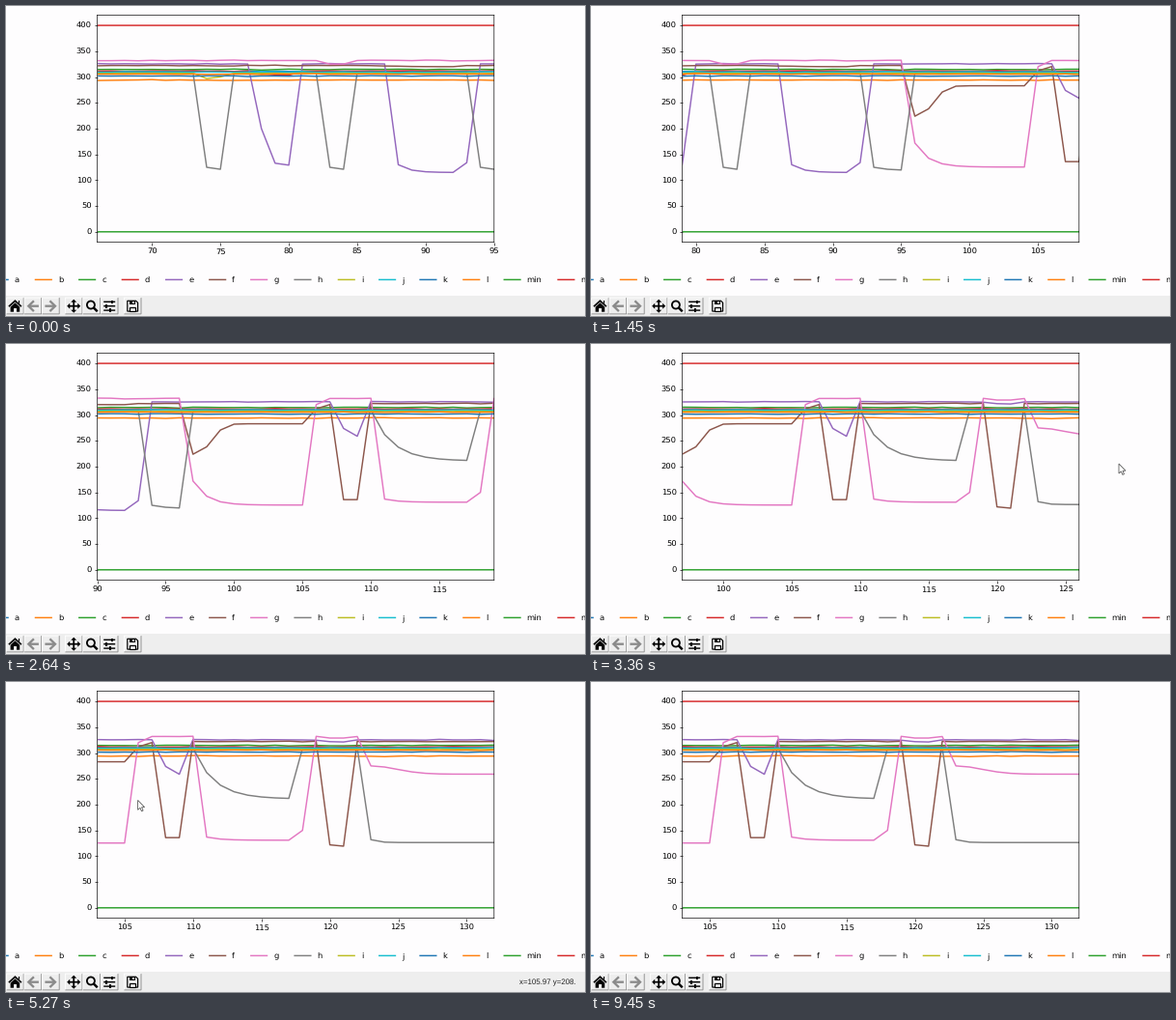
Animation, 600 px wide and 321 px high, one loop 9700 ms. Source, as a matplotlib script:

```python
import numpy as np
import matplotlib.pyplot as plt
from matplotlib.animation import FuncAnimation
from matplotlib.patches import Circle, Polygon, Rectangle
from matplotlib.ticker import MultipleLocator

W, H, DPI = 600, 321, 60
LOOP, STEP = 9700, 25
PT = 72 / DPI                      # points per pixel
LEFT, RIGHT, TOP, BOTTOM = 94.5, 505.8, 9.4, 244.5
Y_MIN, Y_MAX = -20, 420
SPAN, FIRST, SHIFTS, BEAT = 29, 66, 37, 109
PAPER, BAR = "#fefdfe", "#eeeeee"

plt.rcParams.update({"font.family": "DejaVu Sans", "font.size": 10,
                     "text.hinting": "none", "lines.linewidth": 1.75})
fig = plt.figure(figsize=(W / DPI, H / DPI), dpi=DPI, facecolor=PAPER)

# ---------------------------------------------------------------- readings
n = np.arange(62, 137)
rng = np.random.default_rng(4)
LEVELS = dict(a=311, b=294, c=314.6, d=311.5, e=325.5, f=322.3, g=332,
              h=309, i=307.5, j=309.8, k=302, l=305.5)
data = {name: level + rng.normal(0, 0.4, n.size)
        for name, level in LEVELS.items()}
data["min"] = np.zeros(n.size)
data["max"] = np.full(n.size, 400.0)


def dip(name, start, count, first, last, rate=1.0, power=1):
    """Readings that leave the level at `first` and settle towards `last`."""
    k = np.arange(count)
    i = start - n[0]
    data[name][i:i + count] = last + (first - last) * np.exp(-(rate * k) ** power)


dip("d", 78, 3, 306, 303)
dip("e", 78, 3, 200, 129, 2.9)
dip("e", 88, 5, 130, 115, 1.2)
dip("e", 93, 1, 134, 134)
dip("e", 108, 2, 274, 250)
dip("e", 120, 2, 322, 321)
dip("f", 88, 5, 321, 320)
dip("f", 97, 9, 224, 283, 0.6, 2.5)
dip("f", 106, 2, 312, 325)
dip("f", 108, 2, 136, 136)
dip("f", 120, 2, 122, 118)
dip("g", 83, 2, 325, 325)
dip("g", 97, 9, 172, 125.5)
dip("g", 106, 1, 320, 320)
dip("g", 111, 7, 137, 131)
dip("g", 118, 1, 150, 150)
dip("g", 120, 2, 329, 329)
dip("g", 123, 14, 275, 259, 0.38, 2)
for start, count in ((74, 2), (83, 2), (94, 3)):
    dip("h", start, count, 125, 119)
dip("h", 111, 7, 262, 211, 0.65)
dip("h", 123, 14, 132, 126.5, 2)
dip("i", 74, 2, 297, 302)

# ---------------------------------------------------------------- chart
ax = fig.add_axes([LEFT / W, 1 - BOTTOM / H, (RIGHT - LEFT) / W,
                   (BOTTOM - TOP) / H], facecolor=PAPER)
ax.set_ylim(Y_MIN, Y_MAX)
ax.xaxis.set_major_locator(MultipleLocator(5))
ax.yaxis.set_major_locator(MultipleLocator(50))
lines = [ax.plot(n, y, label=name)[0] for name, y in data.items()]

key = fig.legend(handles=lines, ncol=len(lines), loc="center left",
                 bbox_to_anchor=(-18 / W, 1 - 284.1 / H), borderaxespad=0,
                 frameon=False)
for item in [*lines, *key.get_lines(), *ax.spines.values()]:
    item.set_snap(False)

# ---------------------------------------------------------------- pixel layer
top = fig.add_axes([0, 0, 1, 1], zorder=5)
top.set_xlim(0, W)
top.set_ylim(H, 0)
top.axis("off")


def stroke(xs, ys, color="black", w=1.5):
    top.plot(xs, ys, color=color, lw=w * PT, solid_capstyle="butt",
             solid_joinstyle="miter", snap=False)


def fill(points, color="black", **kw):
    return top.add_patch(Polygon(points, fc=color, snap=False,
                                 **{"ec": "none", **kw}))


def box(x, y, w, h, color="black", **kw):
    top.add_patch(Rectangle((x, y), w, h, fc=color, **{"ec": "none", **kw}))


def home(x, y):
    stroke([x - 6.5, x, x + 6.5], [y + 0.5, y - 5.4, y + 0.5], w=1.7)
    fill([(x - 4.8, y + 1), (x, y - 3.4), (x + 4.8, y + 1),
          (x + 4.8, y + 6), (x - 4.8, y + 6)])
    box(x - 1.1, y + 2.2, 2.2, 3.8, BAR)
    box(x + 3.2, y - 5.7, 1.7, 3.5)


def arrow(x, y, s):
    stroke([x + s, x - 4.6 * s, x + s], [y - 5.4, y, y + 5.4], "#8a8a8a", 2.3)
    stroke([x - 4 * s, x + 6 * s], [y, y], "#8a8a8a", 2.3)


def pan(x, y):
    stroke([x - 5, x + 5], [y, y], w=1.7)
    stroke([x, x], [y - 5, y + 5], w=1.7)
    for dx, dy in ((1, 0), (-1, 0), (0, 1), (0, -1)):
        bx, by = x + 4 * dx, y + 4 * dy
        fill([(x + 7 * dx, y + 7 * dy), (bx + 3 * dy, by + 3 * dx),
              (bx - 3 * dy, by - 3 * dx)])


def zoom(x, y):
    top.add_patch(Circle((x - 0.8, y - 1.2), 4, fc="none", ec="black",
                         lw=1.8 * PT))
    stroke([x + 2, x + 6], [y + 1.6, y + 5.6], w=2.4)


def sliders(x, y):
    for dy, knob in ((-4.4, 3), (0, -3), (4.4, 1)):
        stroke([x - 6, x + 6], [y + dy, y + dy], w=1.4)
        box(x + knob - 1.2, y + dy - 1.8, 2.4, 3.6)


def save(x, y):
    edge = dict(ec="black", lw=1.2 * PT)
    fill([(x - 5.4, y - 5.4), (x + 3.4, y - 5.4), (x + 5.4, y - 3.4),
          (x + 5.4, y + 5.4), (x - 5.4, y + 5.4)], BAR, **edge)
    box(x - 3.4, y - 5.4, 6, 3.8)
    box(x + 0.2, y - 4.8, 1.4, 2.4, BAR)
    box(x - 3.2, y + 1, 6.4, 4.4, BAR, **edge)


def button(x, y, size=18.4):
    """Raised frame: light on the upper left, shaded on the lower right."""
    a, b = x - size / 2 + 0.4, x + size / 2 - 0.4
    u, v = y - 8.6, y + 8.2
    stroke([a, a, b], [v, u, u], "white", 0.9)
    stroke([a, b, b], [v, v, u], "#8c8c8c", 0.9)


def toolbar(y=310.7):
    box(0, 300, W, H - 300, BAR)
    groups = (9.4, (home, lambda x, y: arrow(x, y, 1),
                    lambda x, y: arrow(x, y, -1))), \
             (70.2, (pan, zoom, sliders)), (131.2, (save,))
    for x, icons in groups:
        for i, icon in enumerate(icons):
            button(x + 18.5 * i, y)
            icon(x + 18.5 * i, y)


toolbar()
status = top.text(532.4, 313, "", fontsize=7.9 * PT, color="#222222",
                  family="Liberation Sans")

POINTER = np.array([(0, 0), (0, 10), (2.3, 7.9), (3.9, 11.4), (5.5, 10.7),
                    (4, 7.3), (7, 7.2)])
cursor = fill(POINTER, "white", ec="#555555", lw=0.8 * PT)

# stops of the pointer: time, x, y
STOPS = np.array([
    (3200, 562, 108), (3340, 547, 124), (4470, 547, 124),
    (5180, 136.6, 122.4), (5300, 136.6, 122.4), (6150, 256, 134),
    (6470, 256, 134), (7275, 319.35, 105.3), (7325, 325.5, 83),
    (7500, 331, 80), (8150, 352, 122), (8440, 352, 122), (8820, 440, 268)])
SHOW, HIDE = STOPS[0, 0], STOPS[-1, 0]


def pointer(t):
    return [np.interp(t, STOPS[:, 0], STOPS[:, i]) for i in (1, 2)]


def scroll(t, start):
    return FIRST + int(np.clip((t - start) // BEAT + 1, 0, SHIFTS))


def readout(t, left):
    px, py = pointer(t)
    if not (SHOW < t < HIDE and LEFT < px < RIGHT and TOP < py < BOTTOM):
        return ""
    x = left + (px - LEFT) / (RIGHT - LEFT) * SPAN
    y = Y_MAX - (py - TOP) / (BOTTOM - TOP) * (Y_MAX - Y_MIN)
    return f"x={x:.2f} y={int(y)}."


def draw(frame):
    t = frame * STEP
    # curves move first, the scale follows a moment later
    curves, scale = scroll(t, 30), scroll(t, 65)
    ax.set_xlim(scale, scale + SPAN)
    for line in lines:
        line.set_xdata(n - (curves - scale))

    cursor.set_visible(SHOW <= t < HIDE)
    cursor.set_xy(POINTER + pointer(t))
    status.set_text(readout(t - 50, scale) if t < HIDE else "")
    return [*lines, cursor, status]


anim = FuncAnimation(fig, draw, frames=LOOP // STEP, interval=STEP,
                     init_func=lambda: draw(0), repeat=True, repeat_delay=0,
                     blit=False)
plt.show()
```
